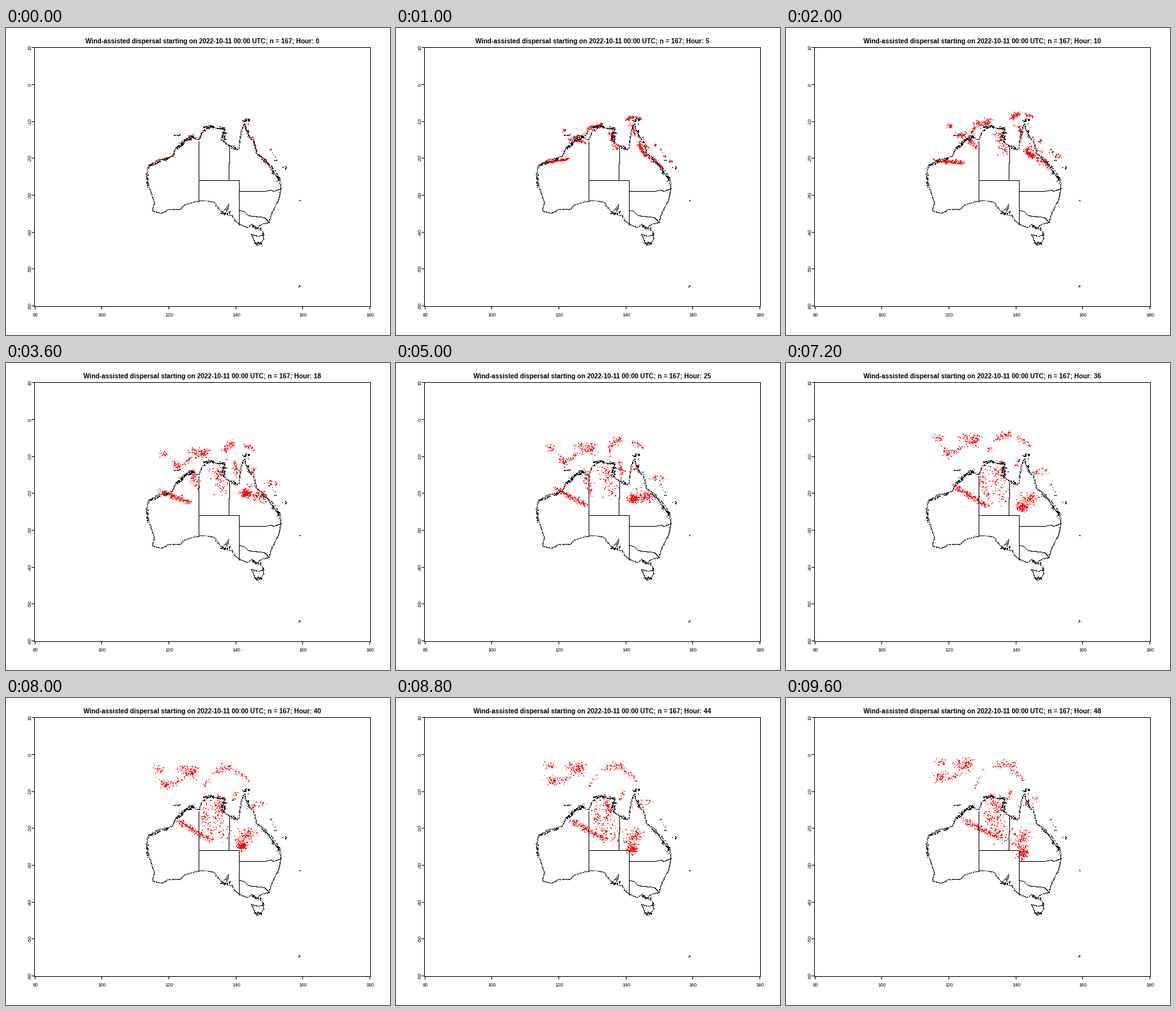
Animation, 600 px wide and 480 px high, one loop 9800 ms. Source, as a matplotlib script:

```python
import numpy as np
import matplotlib.pyplot as plt
from matplotlib.animation import FuncAnimation

W, H, DPI = 600, 480, 100
HOURS = 49
LON_PX, LAT_PX = 5.235, 5.77
rng = np.random.default_rng(11)

plt.rcParams["font.family"] = "Liberation Sans"
fig = plt.figure(figsize=(W / DPI, H / DPI), dpi=DPI, facecolor="white")
ink = np.zeros((H, W), bool)


def pairs(values):
    return np.reshape(np.array(values, float), (-1, 2))


def project(lonlat):
    return np.array([45, 88]) + (lonlat - [80, 0]) * [LON_PX, -LAT_PX]


def densify(p, step=0.5):
    d = np.r_[0, np.cumsum(np.hypot(*np.diff(p, axis=0).T))]
    t = np.linspace(0, d[-1], int(d[-1] / step) + 2)
    return np.column_stack([np.interp(t, d, p[:, k]) for k in (0, 1)])


def stamp(mask, p):
    x, y = np.floor(p).astype(int).T
    mask[y, x] = True


def stroke(*xy):
    stamp(ink, densify(pairs(xy) + 0.5))


def grainy(mask, p):
    """Dots one or two pixels wide and high."""
    stamp(mask, p)
    stamp(mask, p[::2] + [1, 0])
    stamp(mask, p[1::3] + [0, 1])
    stamp(mask, p[::4] + [1, 1])


def put(x, y, text, px, **style):
    return fig.text(x / W, 1 - y / H, text, size=px * 72 / DPI,
                    ha="center", va="baseline", **style)


land = []


def coast(lonlat):
    """Outline through key points, more ragged in the tropics."""
    p = densify(project(pairs(lonlat)), 0.7)
    north = p[:, 1:] < 245
    p += rng.normal(0, 1, p.shape) * np.where(north, 0.6, 0.38)
    stamp(ink, p)
    land.append(p)


def islands(n, spread, *xy):
    p = densify(pairs(xy))
    p = p[rng.integers(0, len(p), n)] + rng.normal(0, spread, (n, 2))
    grainy(ink, p)
    land.append(p)


# Mainland, clockwise from the north-east cape
coast([142.5, -10.7, 143.5, -13.5, 143.9, -14.4, 145.2, -15, 146.2, -18.8,
       148.5, -20.2, 150.8, -23.4, 153.1, -25.9, 153.5, -28.3, 152.7, -31.5,
       150.8, -34.8, 149.9, -37.5, 147.5, -38, 146.4, -39, 144.8, -38,
       143.5, -38.8, 141, -38, 139.7, -36.9, 138.9, -35.5, 138.1, -35.6,
       138.4, -34.5, 137, -35.2, 137.9, -32.6])
coast([137.9, -32.6, 136, -34.8, 134.2, -33, 133.7, -32.1, 131.2, -31.5,
       129, -31.7, 126, -32.3, 124.2, -33, 123.5, -33.9, 120, -33.9,
       118, -35, 115.1, -34.4, 115.7, -32, 114, -27.4, 113.4, -24.4,
       114, -22])
coast([114, -22, 116.7, -20.6, 121, -19.6, 122.2, -17.2, 123.6, -16.8,
       125, -15, 126.5, -13.9, 128.3, -14.9, 129, -15, 130, -13,
       130.8, -12.3, 132.6, -11.4, 134, -11.9, 136.7, -12.2, 135.6, -15,
       139.2, -17.4, 140.2, -17.7, 140.9, -17.4, 141.6, -13, 142.5, -10.7])
coast([144.7, -40.7, 146.5, -41.2, 148.2, -40.8, 148.3, -42, 147, -43.5,
       146.1, -43.5, 144.7, -40.7])

# Island chains
islands(75, 1.3, 267, 187, 281, 175, 294, 168)
islands(24, 0.9, 307, 155, 324, 153)
islands(45, 1.4, 330, 158, 341, 156, 340, 174)
islands(12, 0.9, 352, 184, 358, 187)
islands(22, 1.5, 370, 144, 380, 144)
islands(14, 0.8, 377, 160, 380, 170, 387, 171)
islands(50, 1.3, 400, 204, 416, 220, 428, 240)
islands(22, 1.0, 220, 226, 222, 253)
islands(24, 0.6, 224, 215, 256, 203)
islands(18, 1.0, 336, 289, 348, 292)
islands(24, 0.9, 384, 309, 400, 316, 402, 324)
islands(18, 0.9, 388, 336, 401, 336)
islands(9, 1.0, 264, 168, 273, 168)
islands(12, 1.2, 411, 184, 425, 214, 440, 220)
islands(4, 0.4, 458, 403, 458, 405)
islands(1, 0.1, 458, 270, 459, 270)

# State borders
stroke(301, 177, 301, 271)
stroke(349, 184, 348, 238)
stroke(301, 238, 364, 238, 364, 307)
stroke(364, 255, 404, 255, 414, 253, 418, 255, 429, 251)
stroke(364, 285, 371, 286, 378, 293, 404, 296, 411, 304)

# Frame, ticks and labels
stroke(44, 30, 569, 30, 569, 435, 44, 435, 44, 30)
for lon in range(80, 181, 20):
    x = int(45 + (lon - 80) * LON_PX)
    stroke(x, 435, x, 439)
    put(x + 0.5, 451.3, str(lon), 7.8)
for lat in range(-60, 11, 10):
    y = int(88.3 - lat * LAT_PX)
    stroke(40, y, 44, y)
    put(39.4, y + 0.5, str(lat), 7.8, rotation=90, rotation_mode="anchor")
title = put(306.5, 24.2, "", 10.25, weight="bold")

land = np.vstack(land)
t = np.linspace(0, 1, HOURS)[:, None, None]
tracks = []


def swarm(n, spread, start, middle, end):
    """Particles strung along a segment, on a parabola through three places."""
    u = rng.random((n, 1))
    fuzz = rng.normal(0, spread, (n, 2))
    a, b, c = (np.array(s[:2]) * (1 - u) + np.array(s[2:]) * u
               for s in (start, middle, end))
    gap = np.linalg.norm(a[:, None] - land, axis=2)
    a = land[gap.argmin(axis=1)]
    path = (1 - t) * (1 - 2 * t) * a + 4 * t * (1 - t) * b + t * (2 * t - 1) * c
    phase = rng.uniform(0, 2 * np.pi, (n, 2))
    sway = 0.8 * np.sin(24 * t + phase)
    tracks.append(path + np.minimum(1, 4 * t) * (fuzz * (0.7 + 0.4 * t) + sway))


# North-west
swarm(160, 2.3, (222, 218, 264, 196), (248, 197, 296, 222), (278, 191, 334, 219))
swarm(20, 2.6, (272, 161, 273, 163), (236, 135, 245, 135), (234, 102, 247, 101))
swarm(46, 3.5, (272, 185, 290, 168), (255, 147, 265, 157), (232, 126, 246, 120))
swarm(55, 3.0, (280, 182, 296, 172), (294, 170, 303, 203), (311, 178, 334, 215))
# Top end
swarm(90, 4.2, (305, 165, 325, 153), (284, 132, 312, 136), (268, 105, 288, 104))
swarm(22, 2.0, (301, 172, 306, 162), (272, 151, 285, 142), (252, 126, 270, 121))
swarm(80, 5.5, (338, 160, 350, 184), (324, 162, 336, 203), (324, 155, 342, 224))
# Cape and strait
swarm(42, 2.4, (372, 150, 380, 165), (350, 153, 354, 181), (319, 148, 332, 190))
swarm(48, 3.0, (369, 143, 380, 146), (336, 129, 351, 119), (328, 104, 358, 103))
swarm(24, 2.2, (374, 142, 380, 146), (366, 121, 386, 132), (346, 104, 371, 128))
swarm(11, 1.4, (370, 146, 372, 150), (335, 133, 336, 150), (296, 138, 310, 112))
# East coast and reef
swarm(120, 3.2, (384, 172, 398, 198), (364, 211, 377, 211), (370, 233, 370, 248))
swarm(65, 4.0, (395, 198, 424, 224), (383, 208, 401, 210), (364, 230, 377, 210))
swarm(22, 2.5, (424, 214, 435, 209), (400, 180, 420, 184), (368, 168, 394, 160))
swarm(16, 1.6, (411, 181, 414, 187), (374, 168, 380, 158), (346, 160, 351, 143))
swarm(30, 4.5, (382, 168, 390, 182), (364, 204, 400, 203), (350, 229, 374, 202))
tracks = np.concatenate(tracks, axis=1)


def chart(hour):
    red = np.zeros((H, W), bool)
    grainy(red, tracks[hour])
    img = np.full((H, W, 3), 255, np.uint8)
    img[red] = (255, 0, 0)
    img[ink] = 0
    return img


picture = fig.figimage(chart(0), origin="upper", zorder=-1)


def update(hour):
    picture.set_data(chart(hour))
    title.set_text("Wind-assisted dispersal starting on 2022-10-11 00:00 UTC; "
                   f"n = 167; Hour: {hour}")
    return picture, title


anim = FuncAnimation(fig, update, frames=HOURS, interval=200, repeat=True,
                     repeat_delay=0, blit=False)
plt.show()
```
